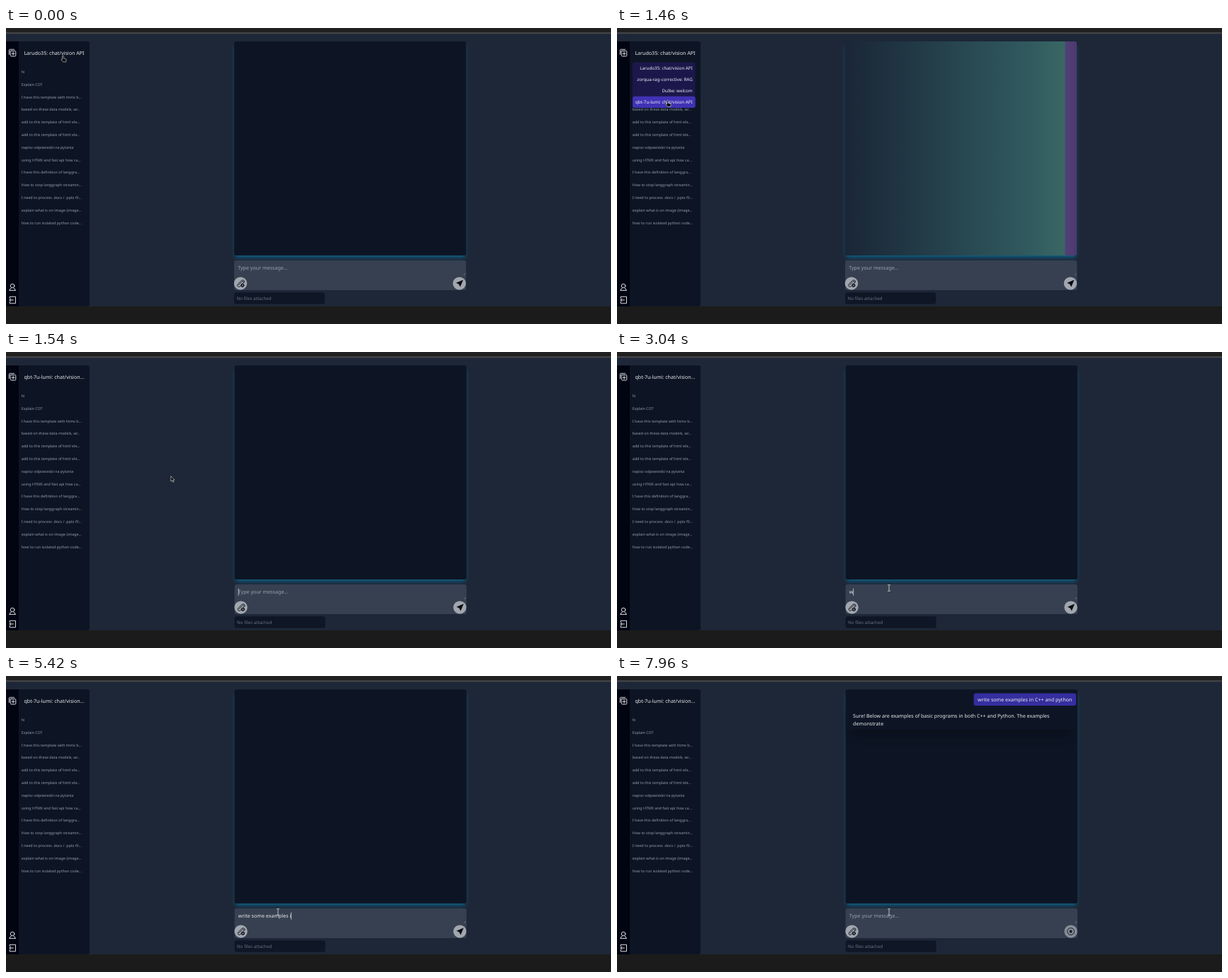
An HTML page that plays this animation: 854 px wide and 419 px high, repeating every 8 s.

```html
<!DOCTYPE html>
<html lang="en">
<head>
<meta charset="utf-8">
<title>Chat</title>
<style>
html, body { margin: 0; width: 100%; height: 100%; overflow: hidden; background: #1d2737; }
svg { display: block; width: 100vw; height: 100vh; }
text { font: 7.117px "Noto Sans", "Open Sans", sans-serif; fill: #e9ebef; text-rendering: geometricPrecision; white-space: pre; }
.list text { font-size: 5.338px; fill: #949ca9; }
.menu text { font-size: 6.227px; text-anchor: end; fill: #eef0f6; }
.line { fill: none; stroke: #e4e7ec; stroke-width: .95; stroke-linecap: round; stroke-linejoin: round; }
.glow { fill: #0784b5; opacity: .5; }
.wide { filter: blur(3.3px); }
.near { filter: blur(1.3px); }
.soft { filter: blur(7px); }
</style>
</head>
<body>
<svg viewBox="0 0 854 419" preserveAspectRatio="none">
  <defs>
    <linearGradient id="sweep">
      <stop offset="0" stop-color="#1a2636"/>
      <stop offset=".25" stop-color="#203643"/>
      <stop offset=".5" stop-color="#284750"/>
      <stop offset=".78" stop-color="#30595e"/>
      <stop offset=".945" stop-color="#396764"/>
      <stop offset=".952" stop-color="#513f77"/>
      <stop offset="1" stop-color="#4c3a6e"/>
    </linearGradient>
    <clipPath id="pane"><rect x="322" y="19" width="327.4" height="303" rx="3"/></clipPath>
  </defs>

  <rect width="854" height="419" fill="#1d2737"/>
  <rect width="854" height="6.2" fill="#212121"/>
  <rect y="6.2" width="854" height="2" fill="#464749"/>
  <rect y="394" width="854" height="25" fill="#1b1b1b"/>

  <path d="M0 19H18V394H0Z" fill="#010411"/>
  <path d="M18 19H115q3 0 3 3V391q0 3-3 3H18Z" fill="#0d1524"/>
  <g class="line">
    <path d="M6.4 32.4h6.2q1.2 0 1.2 1.2v5.2q0 1.2-1.2 1.2H7.6q-1.2 0-1.2-1.2ZM4.4 37.6V31.4q0-1.1 1.1-1.1h6M10.1 34.2v4M8.1 36.2h4"/>
    <circle cx="9.1" cy="365" r="2.8"/>
    <path d="M5 371.400q0-2.600 2.400-3.300M13.200 371.400q0-2.600-2.400-3.300M5 371.400h8.200"/>
    <path d="M5.200 382.600V380.300H13.500V389.800H5.200V387.400M5 385h5.400M6.800 383.200L5 385l1.800 1.800"/>
  </g>

  <text id="title" x="25.4" y="37.5"></text>
  <g id="list" class="list"></g>
  <g id="menu" class="menu"><rect x="22" y="48.4" width="88.6" height="64.7" rx="3" fill="#1c174b"/></g>

  <g id="main">
    <rect class="glow wide" x="323.3" y="24.7" width="324.8" height="300.4" rx="3"/>
    <rect class="glow near" x="323.8" y="22.6" width="323.8" height="299.8" rx="3"/>
    <rect x="322" y="19" width="327.4" height="303" rx="3" fill="#0d1524"/>
    <g clip-path="url(#pane)">
      <rect id="shimmer" x="322" y="19" width="327.4" height="303" fill="url(#sweep)"/>
      <g id="reply">
        <rect id="shade" class="soft" x="331" y="63" width="309" height="22" opacity=".25"/>
        <rect id="card" x="322" y="47" width="327.4" height="29" fill="#0d1524"/>
        <text id="row0" x="332.5" y="58.8"></text>
        <text id="row1" x="332.5" y="69.5"></text>
      </g>
      <g id="ask">
        <rect x="503" y="24.4" width="144.6" height="17.7" rx="3" fill="#352e9f"/>
        <text x="508.5" y="35.9">write some examples in C++ and python</text>
      </g>
    </g>

    <rect x="322" y="329" width="327.4" height="42" rx="3" fill="#374050"/>
    <path d="M645.7 349.7l2.6-2.6M647.3 349.9l1.2-1.2" stroke="#8b919b" stroke-width=".5"/>
    <text id="hint" x="327.2" y="342.4" style="fill:#9aa1ac">Type your message...</text>
    <text id="draft" x="327.2" y="342.4"></text>
    <rect id="caret" y="334.6" width=".7" height="10.2" fill="#e9ebef"/>

    <circle cx="331" cy="361.6" r="9.2" fill="#a1a6af"/>
    <g fill="none" stroke="#11151c" stroke-width=".9" stroke-linecap="round">
      <path d="M328.4 363.7l4.6-4.8q1.1-.9 2 0t0 2l-4.7 4.9q-1.7 1.3-3.1 0t0-3.1l5-5.2q2.4-1.7 4 .2.8 1.3 0 2.6"/>
      <circle cx="333.8" cy="364.3" r="2.2" fill="#11151c"/>
      <path d="M332.7 364.3h2.2M333.8 363.2v2.2" stroke="#a1a6af" stroke-width=".6"/>
    </g>
    <circle id="button" cx="640" cy="361.6" r="9.2"/>
    <path id="send" d="M645.4 356.6L635.3 360.8 639.2 362.7 641.2 366.6Z" fill="#080b10"/>
    <g id="stop">
      <circle cx="640" cy="361.6" r="4.9" fill="none" stroke="#161b24" stroke-width="1"/>
      <rect x="638.2" y="359.8" width="3.6" height="3.6" rx=".6" fill="#161b24"/>
    </g>

    <rect x="322" y="374.3" width="128" height="16.5" rx="3" fill="#0f1726"/>
    <text x="325.5" y="384.6" style="font-size:6.227px;fill:#687180">No files attached</text>
  </g>

  <g id="pointer">
    <path id="hand" d="M-1 .8a.9.9 0 0 1 1.8 0V4l2.8.7q1.2.3 1 1.5L4.1 9H.3L-2.6 5.9q.4-1.3 1.6-.4Z" fill="#060608" stroke="#e8e8e8" stroke-width=".6"/>
    <path id="arrow" d="M0 0V7.4L1.7 5.9 2.9 8.6 4.1 8.1 2.9 5.4H5.2Z" fill="#050505" stroke="#e8e8e8" stroke-width=".6"/>
    <path id="beam" d="M-1.9-4.4h1.4l.5.4.5-.4H1.9M0-4V4M-1.9 4.4h1.4L0 4l.5.4H1.9" fill="none" stroke="#d5d8dc" stroke-width=".85"/>
  </g>
</svg>

<script>
const LOOP = 8000, LOADED = 1500, SENT = 7380;
const $ = id => document.getElementById(id);
const show = (id, on) => { $(id).style.display = on ? "" : "none"; };
const clamp = v => Math.max(0, Math.min(1, v));

function add(parent, tag, attrs, text = "") {
  const el = document.createElementNS("http://www.w3.org/2000/svg", tag);
  for (const k in attrs) el.setAttribute(k, attrs[k]);
  el.textContent = text;
  return parent.appendChild(el);
}

const chats = ["hi", "Explain COT", "I have this template with htmx b...", "based on these data models, wr...",
  "add to this template of html ele...", "add to this template of html ele...", "napisz odpowiedzi na pytania",
  "using HTMX and fast api how ca...", "I have this definition of langgra...", "How to stop langgraph streamin...",
  "I need to process .docs / .pptx fil...", "explain what is on image (image...", "how to run isolated python code..."];
chats.forEach((s, i) => add($("list"), "text", { x: 21.8, y: 64 + i * 17.8 }, s));

// label, hover start, hover end
const models = [
  ["Larudo35: chat/vision API", 250, 420],
  ["zorqua-rag-corrective: RAG", 420, 580],
  ["Dulbe: welcom", 580, 1185],
  ["qbt-7u-lumi: chat/vision API", 1250, LOADED],
];
const hovers = models.map(([s], i) => {
  const y = 48.5 + i * 16.1;
  const bar = add($("menu"), "rect", { x: 22, y, width: 88.6, height: 16.2, rx: 3, fill: "#4032b4" });
  add($("menu"), "text", { x: 106.7, y: y + 10.4 }, s);
  return bar;
});

// pointer: time, x, y
const path = [[0, 80.5, 39], [80, 80.5, 39], [300, 75, 54], [500, 71.5, 72], [710, 71, 88], [1170, 71, 88],
  [1250, 71.5, 97], [1340, 69.5, 101.5], [1460, 69.5, 101.5], [1540, 231.7, 174.7], [1640, 345, 270],
  [1780, 405, 320], [1960, 419, 334], [2080, 419, 334], [2130, 384, 334]];

function pointerAt(t) {
  const i = path.findIndex(p => p[0] > t);
  if (i < 0) return path[path.length - 1].slice(1);
  const [t0, x0, y0] = path[i - 1], [t1, x1, y1] = path[i];
  const k = (t - t0) / (t1 - t0);
  return [x0 + (x1 - x0) * k, y0 + (y1 - y0) * k];
}

// typing bursts: first key, last key, text
const bursts = [[3040, 3040, "w"], [3210, 3580, "rite"], [4040, 4420, " some e"], [4670, 4670, "x"],
  [4830, 5210, "amples "], [5380, 5630, "in C"], [5920, 6460, "++ and "], [6750, 7210, "python "]];

function typed(t) {
  let out = "";
  for (const [a, b, s] of bursts) {
    if (t < a) break;
    const gap = (b - a) / Math.max(1, s.length - 1);
    out += s.slice(0, gap ? Math.floor((t - a) / gap + 1.001) : s.length);
  }
  return out;
}

const words = "Sure! Below are examples of basic programs in both C++ and Python. The examples demonstrate".split(" ");

function render(t) {
  const loaded = t >= LOADED, sent = t >= SENT;
  $("title").textContent = loaded ? "qbt-7u-lumi: chat/vision..." : "Larudo35: chat/vision API";
  $("main").setAttribute("transform", `translate(${loaded ? 0.6 : 0})`);

  show("menu", t >= 160 && !loaded);
  models.forEach(([, a, b], i) => {
    hovers[i].style.opacity = Math.min(clamp((t - a) / 90), 1 - clamp((t - b) / 90));
  });
  show("shimmer", t >= 1400 && !loaded);
  $("shimmer").style.opacity = clamp((t - 1400) / 60);

  const draft = sent ? "" : typed(t);
  $("draft").textContent = draft;
  show("hint", !draft);
  show("caret", loaded && !sent && (draft || t < 2080 || t >= 2540));
  $("caret").setAttribute("x", 327.2 + (draft ? $("draft").getComputedTextLength() : 0));

  show("ask", sent);
  show("send", !sent);
  show("stop", sent);
  $("button").setAttribute("fill", sent ? "#878d98" : "#a1a6af");

  const n = Math.floor((t - 7440) / 36) + 1;
  const two = n > 14;
  show("reply", n > 0);
  $("row0").textContent = words.slice(0, Math.max(0, Math.min(n, 14))).join(" ");
  $("row1").textContent = two ? words[14] : "";
  $("card").setAttribute("height", two ? 29 : 18.3);
  $("shade").setAttribute("y", two ? 63 : 52.3);

  const [x, y] = pointerAt(t);
  $("pointer").setAttribute("transform", `translate(${x} ${y})`);
  show("hand", !loaded);
  show("arrow", loaded && y < 329);
  show("beam", loaded && y >= 329);
}

function tick(now) {
  render(now % LOOP);
  requestAnimationFrame(tick);
}
render(0);
requestAnimationFrame(tick);
</script>
</body>
</html>
```
